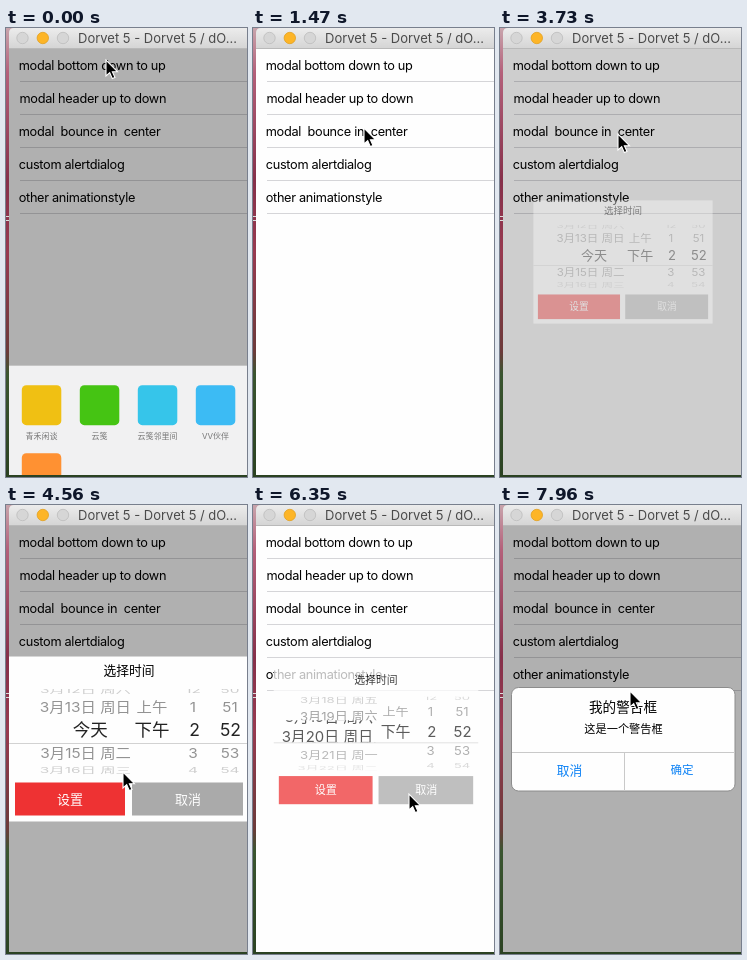
An HTML page that plays this animation: 241x449 px, repeating every 7990 ms.

```html
<!DOCTYPE html>
<html lang="zh">
<head>
<meta charset="utf-8">
<style>
html, body { margin: 0; width: 100%; height: 100%; overflow: hidden; }
svg { display: block; width: 241px; height: 449px; font-family: Inter, "Noto Sans CJK SC", "Noto Sans CJK", sans-serif; }
text { white-space: pre; }
.row { letter-spacing: -.31px; }
</style>
</head>
<body>
<svg viewBox="0 0 241 449">
  <defs>
    <linearGradient id="wall" x2="0" y2="1">
      <stop offset="0" stop-color="#c8a4ac"/>
      <stop offset=".1" stop-color="#b4607a"/>
      <stop offset=".34" stop-color="#86304a"/>
      <stop offset=".5" stop-color="#983a50"/>
      <stop offset=".72" stop-color="#6c3a3a"/>
      <stop offset=".77" stop-color="#3a5530"/>
      <stop offset="1" stop-color="#2b4222"/>
    </linearGradient>
    <linearGradient id="bar" x2="0" y2="1">
      <stop offset="0" stop-color="#ececec"/>
      <stop offset="1" stop-color="#d4d4d4"/>
    </linearGradient>
    <clipPath id="screen"><path d="M3 21H241V447H3Z"/></clipPath>
    <clipPath id="band"><path d="M3 212H243V238H3Z"/></clipPath>
    <clipPath id="rim"><path d="M3 184H243V212H3ZM3 238H243V271H3Z"/></clipPath>
  </defs>
  <rect width="241" height="449" fill="url(#wall)"/>
  <path d="M0 188.5H3M0 192.5H3" stroke="#ddd"/>
  <rect x="3" y="21" width="238" height="426" fill="#fefefe"/>
  <g id="list"></g>
  <g id="live" clip-path="url(#screen)"></g>
  <path d="M3 21V5Q3 0 8 0H241V21Z" fill="url(#bar)"/>
  <path d="M3 20.5H241" stroke="#b9b9b9"/>
  <g stroke-width=".8">
    <circle cx="16.5" cy="10" r="5.7" fill="#d6d6d6" stroke="#bdbdbd"/>
    <circle cx="36.8" cy="10" r="5.7" fill="#fdb527" stroke="#e3a01f"/>
    <circle cx="57" cy="10" r="5.7" fill="#d6d6d6" stroke="#bdbdbd"/>
  </g>
  <text x="72" y="15" font-size="13" fill="#4a4a4a">Dorvet 5 - Dorvet 5 / dO…</text>
  <path id="cursor" d="M0 0V16L3.7 12.6 6.3 18.6 9 17.4 6.4 11.7H11.4Z" stroke="#fff" stroke-width="1.1"/>
</svg>
<script>
const LOOP = 7990;
const $ = id => document.getElementById(id);
const clamp = v => Math.min(1, Math.max(0, v));
const smooth = u => u * u * (3 - 2 * u);
const easeOut = u => 1 - (1 - u) ** 2;
const backOut = u => 1 + 2.7 * (u - 1) ** 3 + 1.7 * (u - 1) ** 2;
const span = (t, start, length) => clamp((t - start) / length);

// y is the middle of the line
const text = (s, x, y, size, fill = '#000', anchor = 'middle', cls = '') =>
  `<text class="${cls}" x="${x}" y="${y + size * .37}" font-size="${size}" fill="${fill}" text-anchor="${anchor}">${s}</text>`;
const rect = (x, y, w, h, fill, more = '') =>
  `<rect x="${x}" y="${y}" width="${w}" height="${h}" fill="${fill}" ${more}/>`;

const rows = ['modal bottom down to up', 'modal header up to down', 'modal  bounce in  center',
  'custom alertdialog', 'other animationstyle'];
$('list').innerHTML = rows.map((s, i) =>
  text(s, i == 1 ? 13.5 : 12.7, 37 + 33 * i, 12.75, '#000', 'start', 'row') +
  rect(14, 53 + 33 * i, 227, 1, '#d5d5d8')).join('');

// time, x, y of the pointer tip
const path = [[0, 100, 32], [30, 100, 33], [500, 96, 195], [800, 95, 236], [860, 96, 248], [1150, 96, 248],
  [1470, 111, 100], [1620, 111, 100], [1740, 110, 76], [2100, 110, 76], [2600, 104, 269], [2970, 104, 269],
  [3280, 118, 106], [3850, 118, 106], [4440, 123, 262], [4560, 117, 267], [4820, 69, 241], [4970, 69, 241],
  [5220, 62, 200], [5320, 62, 200], [5730, 129, 285], [6020, 156, 289], [6400, 156, 289], [6610, 152, 291],
  [7020, 129, 149], [7450, 129, 149], [7800, 130, 186], [LOOP, 130, 186]];

function pointer(t) {
  const i = path.findIndex(p => p[0] > t);
  const [t0, x0, y0] = path[i - 1], [t1, x1, y1] = path[i];
  const k = smooth((t - t0) / (t1 - t0));
  return `translate(${x0 + (x1 - x0) * k} ${y0 + (y1 - y0) * k})`;
}

const dim = (t, open, close) =>
  rect(3, 21, 238, 426, '#000', `opacity="${.31 * span(t, open, 100) * (1 - span(t, close, 80))}"`);

const tiles = [['#f0c013', '青禾闲谈'], ['#45c413', '云笺'], ['#36c5ea', '云笺邻里间'], ['#3cbbf4', 'VV伙伴'], ['#ff9132', '短信']];
function sheet(t) {
  const top = 297 + 41 * (1 - easeOut(span(t, 0, 260))) + 150 * smooth(span(t, 1040, 300));
  return dim(t, -200, 1040) + `<g transform="translate(0 ${top})">` + rect(3, 0, 238, 160, '#f1f1f2') +
    tiles.map(([color, label], i) => {
      const x = 15.8 + 58 * (i % 4), y = i < 4 ? 19.5 : 87.5;
      return rect(x, y, 39.5, 40, color, 'rx="4.5"') + text(label, x + 19.7, y + 50.5, 8, '#777');
    }).join('') + '</g>';
}

function header(t) {
  const y = 21 - 40 * (1 - easeOut(span(t, 1950, 300)) + smooth(span(t, 2830, 300)));
  return dim(t, 1950, 2830) + `<g transform="translate(0 ${y})">` + rect(3, 0, 238, 40, '#fa5a15') +
    text('推送通知:', 20, 19, 13.2, '#fff', 'start') + text('今晚打老虎', 104, 19, 13.2, '#fff', 'start') + '</g>';
}

// Scales its content about the middle of the screen
function popup(t, open, close, content) {
  const k = smooth(span(t, close, 300)), u = span(t, open, 400);
  const scale = (.4 + .6 * backOut(u)) * (1 - .56 * k);
  return dim(t, open, close) +
    `<g opacity="${clamp(u * 2.5) * (1 - k)}" transform="translate(123 234) scale(${scale}) translate(-123 -234)">${content}</g>`;
}

const dateLabel = n => n == 14 ? '今天' : `3月${n}日 周${'日一二三四五六'[(n + 1) % 7]}`;
function wheel(label, pos, x, rimX, anchor) {
  let band = '', rim = '';
  for (let i = Math.round(pos) - 2; i <= Math.round(pos) + 2; i++) {
    const s = label(i), d = i - pos, a = d * .515, shift = s == '今天' ? -18 : 0;
    band += text(s, x + shift, 225 + 23.5 * d, 17.5, '#222', anchor);
    rim += `<g transform="translate(0 ${225 + 46.7 * Math.sin(a)}) scale(1 ${Math.cos(a)})" opacity="${.65 - .23 * Math.abs(d)}">` +
      text(s, rimX + shift, 0, 15.4, '#000', anchor) + '</g>';
  }
  return `<g clip-path="url(#band)">${band}</g><g clip-path="url(#rim)">${rim}</g>`;
}

function picker(t) {
  const day = 14 + 6.2 * (1 - Math.exp(-Math.max(0, t - 4970) / 520));
  return popup(t, 3670, 6250,
    rect(3, 151.5, 240, 165, '#fefefe') + text('选择时间', 123, 165, 12.75) +
    wheel(dateLabel, day, 119.7, 125, 'end') +
    wheel(i => ['上午', '下午'][i] || '', 1, 146, 146, 'middle') +
    wheel(i => i || 12, 2, 188.5, 187, 'middle') +
    wheel(i => i, 52, 224.5, 224, 'middle') +
    rect(3, 238, 240, 1, '#d2d2d2') +
    rect(9, 277.5, 110, 33, '#ee3233') + text('设置', 64, 294, 13, '#fff') +
    rect(126, 277.5, 111, 33, '#aaa') + text('取消', 182, 294, 13, '#fff'));
}

const alertBox = t => popup(t, 7320, 9999,
  rect(11.5, 182.5, 223.5, 103.5, '#fefefe', 'rx="7" stroke="#8c8c8c"') +
  text('我的警告框', 123, 202, 13.6) + text('这是一个警告框', 123.5, 224, 11.2) +
  rect(12, 247, 223, 1, '#c9c9c9') + rect(124, 247, 1, 39, '#c9c9c9') +
  text('取消', 69.5, 265, 12.75, '#0a80f5') + text('确定', 182, 265, 11.5, '#0a80f5'));

function frame(now) {
  const t = now % LOOP;
  $('live').innerHTML =
    t < 1340 ? sheet(t) :
    t < 1950 ? '' :
    t < 3130 ? header(t) :
    t < 3670 ? '' :
    t < 6550 ? picker(t) :
    t < 7320 ? '' : alertBox(t);
  $('cursor').setAttribute('transform', pointer(t));
}

const start = performance.now();
(function tick() {
  frame(performance.now() - start);
  requestAnimationFrame(tick);
})();
</script>
</body>
</html>
```
